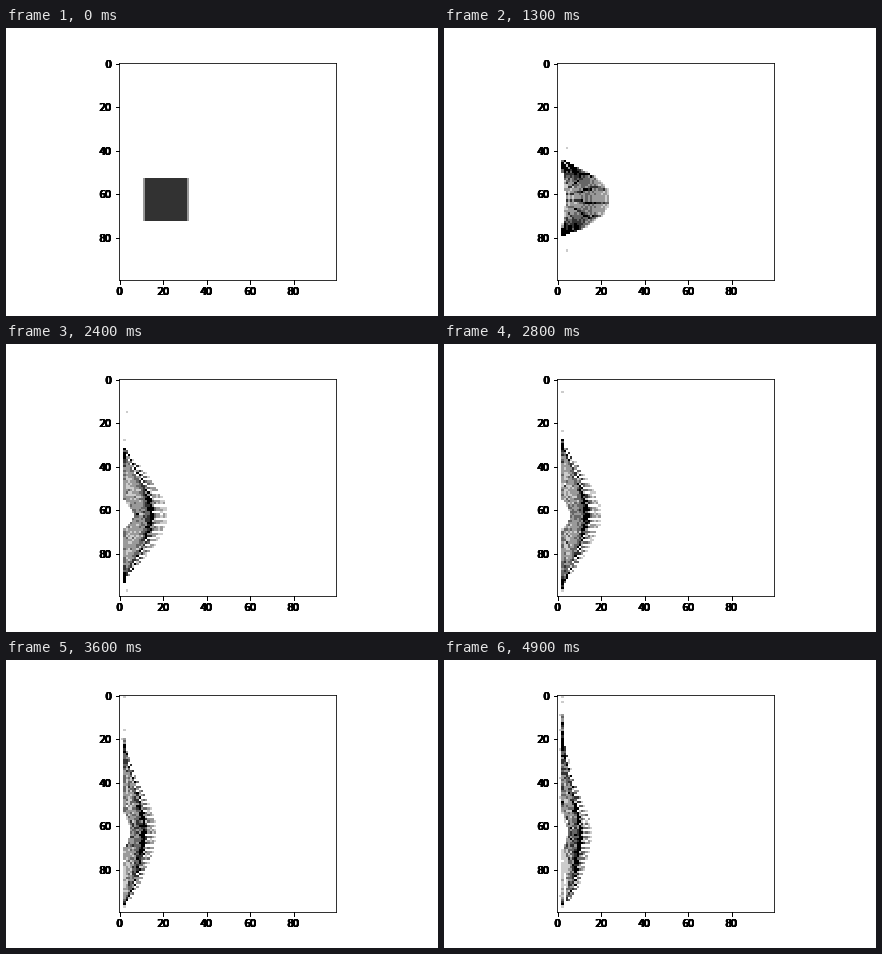
These frames come from a looping animation (432x288 px, 5000 ms). A matplotlib script:

```python
import numpy as np
import matplotlib.pyplot as plt
from matplotlib.animation import FuncAnimation
from matplotlib.transforms import ScaledTranslation

plt.rcParams["font.family"] = "DejaVu Sans"
plt.rcParams["font.size"] = 10

GRID, SIDE = 100, 40
FRAMES, INTERVAL = 50, 100
WALL, CENTRE_ROW = 2.2, 62.76
DROP, IMPACT = 9.8, 0.5

# Lattice: "across" runs along the wall, "depth" away from it.
row, col = np.mgrid[0:SIDE, 0:SIDE]
across = (row - (SIDE - 1) / 2) / (SIDE / 2)
depth = col / SIDE
upper = across < 0
jitter = np.random.default_rng(3).normal(size=(2, SIDE, SIDE))


def ease(t, start, end):
    s = np.clip((t - start) / (end - start), 0, 1)
    return s * s * (3 - 2 * s)


def lerp(a, b, s):
    return a + (b - a) * s


def particles(frame):
    t = frame * INTERVAL / 1000
    since = max(t - IMPACT, 0)
    late = max(t - 1.7, 0)
    bend, gather = ease(t, 0.7, 1.4), ease(t, 0.9, 1.9)

    # The layers close up into one dense shell around a hollow.
    fall = max(0, DROP - 0.25 * (frame + 1) ** 2)
    apex = 20 + 2.4 * ease(t, 0.5, 1.3) - 8.4 * (1 - np.exp(-(late / 1.4) ** 2))
    c = 2 * depth - 1
    shell = 0.62 + 0.38 * (0.2 * c + 0.8 * c ** 3)
    height = apex * lerp(depth, shell, gather)

    # The block spreads along the wall and is stopped by the lower edge.
    growth = 12.2 * since - 0.4 * since ** 2
    half = 10 + growth * (1 - 0.4 * depth * (1 - gather))
    half = np.where(upper, half, np.minimum(half, 34.8))
    half = half * (1 - 0.75 * gather * (1 - depth) ** 2)
    cubic = np.where(upper, 0.3 * ease(t, 1.7, 3.7), 0)
    offset = lerp(across, across ** 3, cubic)

    power = lerp(5, 2, bend) - 0.2 * late
    flare_up = 1 + 0.4 * max(t - 1.5, 0)
    flare_low = lerp(flare_up, 0.55, ease(t, 2.4, 4.2))
    flare = np.where(upper, flare_up, flare_low)
    bent = bend * np.minimum(np.abs(offset) / 0.975, 1) ** power

    noise = 0.04 * late
    x = WALL + fall + height * (1 - bent) ** flare + noise * jitter[0]
    y = CENTRE_ROW + half * offset + noise * jitter[1]

    # A few stray particles run ahead along the wall at constant speed.
    if t >= 0.9:
        lead = 21.5 * t - 4.3
        x[[0, -1], -1] = max(2.3, 6 - 1.2 * t)
        y[[0, -1], -1] = CENTRE_ROW - lead, CENTRE_ROW + lead
    if t >= 1.7:
        x[0, -2], y[0, -2] = 2.3, 52.8 - 10.1 * t
    return np.clip(x, 1, 98), np.clip(y, 1.6, 97.3)


def density(frame):
    x, y = particles(frame)
    counts = np.zeros((GRID, GRID))
    np.add.at(counts, (y.astype(int), x.astype(int)), 1)
    return counts


fig = plt.figure(figsize=(6, 4), dpi=72, facecolor="white")
BOX = [112.68 / 432, 36 / 288, 217.44 / 432, 217.44 / 288]


def add_axes(label):
    ax = fig.add_axes(BOX, label=label, facecolor="none")
    ax.set(xlim=(-0.5, GRID - 0.5), ylim=(GRID - 0.5, -0.5),
           xticks=range(0, GRID, 20), yticks=range(0, GRID, 20))
    return ax


main = add_axes("main")
image = main.imshow(density(0), cmap="gray_r", vmin=0, vmax=5,
                    interpolation="nearest", aspect="auto")
# Stacked labels, every other one a pixel to the left, look heavy.
for n in range(6):
    overlay = add_axes(f"overlay {n}")
    overlay.spines[:].set_visible(False)
    shift = ScaledTranslation(-(n % 2) / 72, 0, fig.dpi_scale_trans)
    for text in overlay.get_xticklabels() + overlay.get_yticklabels():
        text.set_transform(text.get_transform() + shift)


def update(frame):
    image.set_data(density(frame))
    return [image]


anim = FuncAnimation(fig, update, frames=FRAMES, interval=INTERVAL,
                     repeat=True, repeat_delay=0, blit=False)
plt.show()
```
